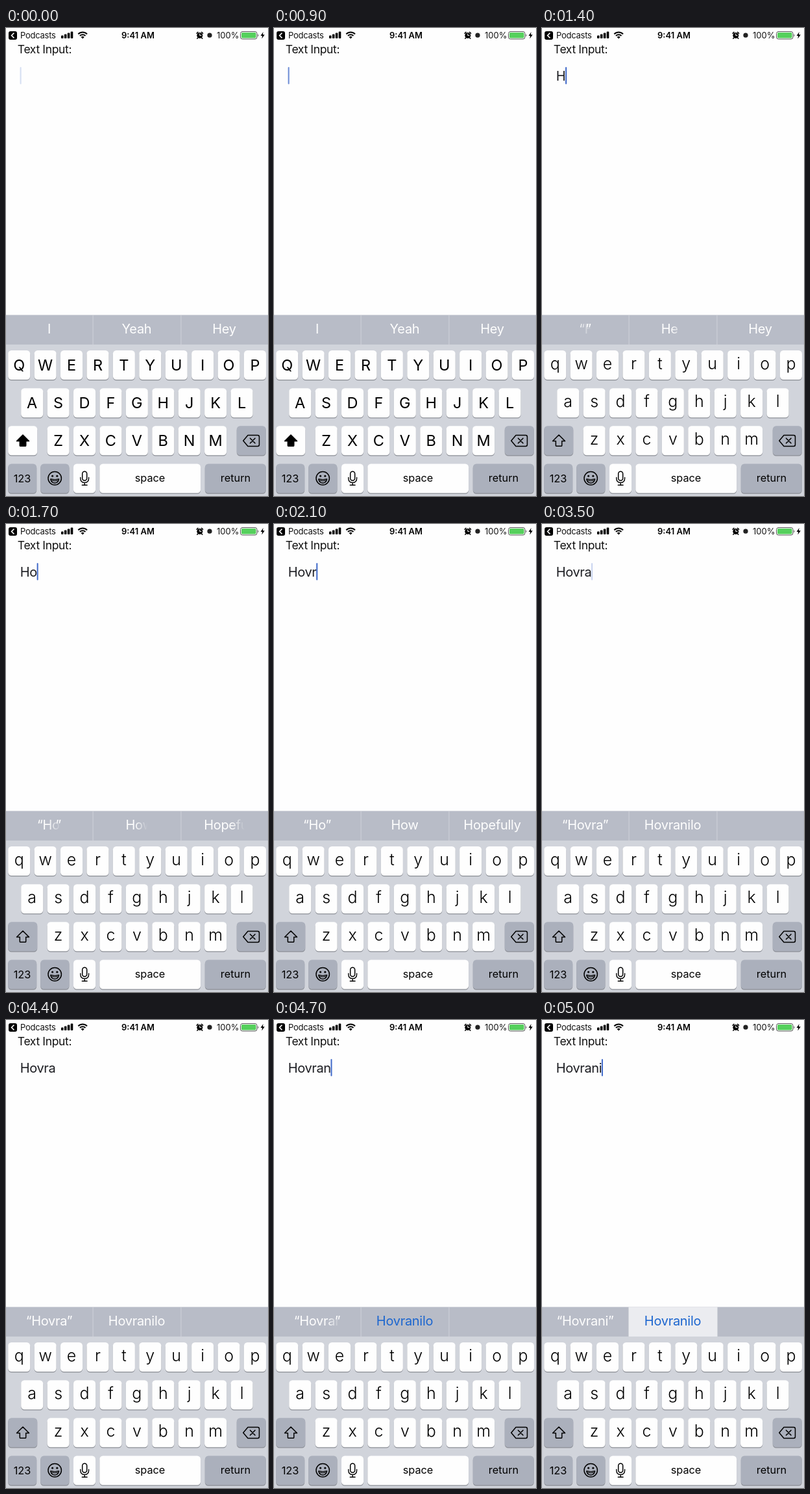
Recreate the animation shown at these times as an HTML page with a canvas. Size 404 by 720 pixels, loop 5100 ms.

```html
<!DOCTYPE html>
<html lang="en">
<head>
<meta charset="utf-8">
<title>Text input</title>
<style>
html, body { margin: 0; width: 100%; height: 100%; overflow: hidden; background: #fefefe; }
canvas { display: block; width: 404px; height: 720px; }
</style>
</head>
<body>
<canvas id="stage"></canvas>
<script>
const W = 404, H = 720, LOOP = 5100;
const FONT = 'Inter, Roboto, sans-serif';
const canvas = document.getElementById('stage');
const ctx = canvas.getContext('2d');
const dpr = window.devicePixelRatio || 1;
canvas.width = W * dpr;
canvas.height = H * dpr;

const NAME = 'Hovranilo';
const KEY_TIMES = [1300, 1600, 1800, 2000, 2300, 4600, 4800];
const quote = n => '\u201c' + NAME.slice(0, n) + '\u201d';
const HINTS = [
  { at: 0, words: ['I', 'Yeah', 'Hey'] },
  { at: 1300, words: [quote(1), 'He', 'Hey'] },
  { at: 1600, words: [quote(2), 'How', 'Hopefully'] },
  { at: 2400, words: [quote(5), NAME, ''] },
  { at: 4700, words: [quote(7), NAME, ''], pick: true }
];
const HINT_MS = 200;
const CENTERS = [66.5, 201.5, 336.5];
const WHITE = '#fefefe', DARK = '#abb0bc';

const clamp = v => Math.max(0, Math.min(1, v));
const mix = (a, b, p) => a + (b - a) * p;

function setFont(size, weight = 400, spacing = 0) {
  ctx.font = `${weight} ${size}px ${FONT}`;
  ctx.letterSpacing = size * spacing + 'px';
}

function text(str, x, y, size, o = {}) {
  setFont(size, o.weight, o.spacing);
  ctx.textAlign = o.align || 'left';
  ctx.fillStyle = o.color || '#111';
  ctx.fillText(str, x, y);
}

function box(x, y, w, h, r, color) {
  ctx.fillStyle = color;
  ctx.beginPath();
  ctx.roundRect(x, y, w, h, r);
  ctx.fill();
}

function path(d, width, fill) {
  const p = new Path2D(d);
  if (fill) { ctx.fillStyle = fill; ctx.fill(p); }
  if (width) { ctx.lineWidth = width; ctx.stroke(p); }
}

function arc(x, y, r, from = 0, to = Math.PI * 2) {
  ctx.beginPath();
  ctx.arc(x, y, r, from, to);
}

function disc(x, y, r) {
  arc(x, y, r);
  ctx.fill();
}

function statusBar() {
  box(4, 5, 13, 13, 3, '#000');
  ctx.strokeStyle = WHITE;
  path('M12 8 L8.5 11.5 L12 15', 1.7);
  text('Podcasts', 22, 16, 13, { spacing: -0.02 });
  for (let i = 0; i < 4; i++) box(85 + i * 4.9, 11.5 - i * 2, 3.6, 4.5 + i * 2, 1, '#000');

  ctx.strokeStyle = ctx.fillStyle = '#000';
  ctx.lineCap = 'butt';
  ctx.lineWidth = 2;
  for (const r of [6, 9.7]) {
    arc(118.2, 16.2, r, -Math.PI * 0.75, -Math.PI * 0.25);
    ctx.stroke();
  }
  path('M118.2 16.6 L115.7 13.9 Q118.2 11.6 120.7 13.9 Z', 0, '#000');

  text('9:41 AM', 203.5, 16, 13, { weight: 600, align: 'center', color: '#000' });

  ctx.fillStyle = '#000';
  disc(298.8, 11.4, 4.5);
  ctx.lineCap = 'round';
  path('M294 8.2 L296 6.4 M303.6 8.2 L301.6 6.4 M296 15 L294.8 16.3 M301.6 15 L302.8 16.3', 1.5);
  ctx.strokeStyle = WHITE;
  path('M298.8 8.8 V11.6 H301', 1);
  ctx.fillStyle = '#222';
  disc(314, 11.2, 3.6);

  text('100%', 325, 16, 13);
  ctx.strokeStyle = '#555';
  ctx.lineWidth = 1;
  ctx.beginPath();
  ctx.roundRect(361.5, 5.5, 25.5, 11.5, 3);
  ctx.stroke();
  box(363, 7, 22.5, 8.5, 1.5, '#55d05c');
  path('M388.4 9.2 Q390.6 11.2 388.4 13.4 Z', 0, '#555');
  path('M396.6 6 L392.6 12 H395.2 L394.4 16.6 L398.8 10.2 H396 Z', 0, '#000');
}

function cursorAlpha(t) {
  const typing = t >= KEY_TIMES[0];
  if (typing && t < 2900 || t >= KEY_TIMES[5]) return 1;
  const phase = (t - (typing ? 150 : 0) + 1000) % 1000;
  if (phase < 40 || phase >= 860) return clamp(1 - ((phase + 140) % 1000) / 180);
  return clamp((phase - 300) / 180);
}

function field(t) {
  const typed = NAME.slice(0, KEY_TIMES.filter(k => t >= k).length);
  text('Text Input:', 17.8, 39, 17.5, { spacing: -0.02 });
  text(typed, 21.8, 81, 20, { spacing: -0.02, color: '#1c1d22' });
  const x = typed ? 21.6 + ctx.measureText(typed).width : 21.6;
  ctx.globalAlpha = cursorAlpha(t);
  box(x, 60, 2, 26.5, 1, '#3f69c9');
  ctx.globalAlpha = 1;
}

// The word grows from the old width to its own, with a soft right edge.
function hint(prev, next, cx, p, color) {
  setFont(20, 400, -0.015);
  ctx.textAlign = 'left';
  const oldW = ctx.measureText(prev).width, newW = ctx.measureText(next).width;
  if (!next || p >= 1 || prev === next) {
    const gone = !next;
    ctx.globalAlpha = gone ? 1 - p : 1;
    ctx.fillStyle = color;
    ctx.fillText(gone ? prev : next, cx - (gone ? oldW : newW) / 2, 469.5);
    ctx.globalAlpha = 1;
    return;
  }
  const w = mix(oldW, newW, p), left = cx - w / 2, right = cx + w / 2;
  const fade = ctx.createLinearGradient(right - 20, 0, right, 0);
  fade.addColorStop(0, 'rgba(254,254,254,1)');
  fade.addColorStop(1, 'rgba(254,254,254,0)');
  const quoted = next.endsWith('\u201d');
  ctx.fillStyle = fade;
  ctx.fillText(quoted ? next.slice(0, -1) : next, left, 469.5);
  if (quoted) {
    ctx.fillStyle = color;
    ctx.fillText('\u201d', right - ctx.measureText('\u201d').width, 469.5);
  }
}

function hintBar(t) {
  ctx.fillStyle = '#b8bcc7';
  ctx.fillRect(0, 441.5, W, 45.5);
  const i = HINTS.filter(h => t >= h.at).length - 1;
  const now = HINTS[i], before = HINTS[i - 1] || now;
  const p = i ? clamp((t - now.at) / HINT_MS) : 1;
  ctx.fillStyle = '#cfd2d9';
  ctx.fillRect(133.6, 442, 1, 45);
  ctx.fillRect(269.4, 442, 1, 45);
  if (now.pick) {
    ctx.globalAlpha = p;
    ctx.fillStyle = '#ebecf0';
    ctx.fillRect(133.6, 441.5, 136.8, 45.5);
    ctx.globalAlpha = 1;
  }
  now.words.forEach((word, n) => {
    hint(before.words[n], word, CENTERS[n], p, now.pick && n === 1 ? '#1c66cf' : WHITE);
  });
}

function key(x, y, w, color) {
  box(x, y + 1.2, w, 45, 5.2, '#8b8e95');
  box(x, y, w, 45, 5.2, color);
}

function letters(row, x, y, caps) {
  [...row].forEach((c, i) => {
    const kx = x + i * 40.42;
    key(kx, y, 34, WHITE);
    text(caps ? c : c.toLowerCase(), kx + 17, y + (caps ? 31 : 29), caps ? 23.5 : 25,
      { align: 'center', color: '#000', weight: caps ? 400 : 300 });
  });
}

function icons(caps) {
  ctx.strokeStyle = '#000';
  ctx.lineJoin = 'round';
  ctx.lineCap = 'round';
  path('M26 626 L35.5 635.5 H30.7 V642.2 Q30.7 643.3 29.6 643.3 H22.4 Q21.3 643.3 21.3 642.2 V635.5 H16.5 Z',
    1.5, caps ? '#000' : null);
  path('M373 626.5 H388 Q390.5 626.5 390.5 629 V641 Q390.5 643.5 388 643.5 H373 L365.8 635 Z', 1.5);
  path('M376.5 631.2 L384 638.8 M384 631.2 L376.5 638.8', 1.6);

  ctx.lineWidth = 1.5;
  arc(75.2, 692.7, 10.2);
  ctx.stroke();
  ctx.fillStyle = '#000';
  disc(71.6, 689.3, 1.5);
  disc(78.8, 689.3, 1.5);
  path('M68.7 694 Q75.2 695.6 81.7 694 Q80.5 700 75.2 700 Q69.9 700 68.7 694 Z', 1.3);
  path('M70 696.3 Q75.2 697.6 80.4 696.3', 1);

  ctx.beginPath();
  ctx.roundRect(117.7, 682.3, 7, 14, 3.5);
  ctx.lineWidth = 1.5;
  ctx.stroke();
  path('M114.8 691.5 V693 Q114.8 699.4 121.2 699.4 Q127.6 699.4 127.6 693 V691.5 M121.2 699.4 V703 M117.3 703.2 H125.1', 1.4);
}

function keyboard(t) {
  const caps = t < KEY_TIMES[0];
  ctx.fillStyle = '#d1d4db';
  ctx.fillRect(0, 487, W, H - 487);
  letters('QWERTYUIOP', 3.2, 496, caps);
  letters('ASDFGHJKL', 23.2, 554.2, caps);
  letters('ZXCVBNM', 63.6, 612.3, caps);
  key(3.2, 612.3, 45, caps ? WHITE : DARK);
  key(355.8, 612.3, 45, DARK);
  key(3.2, 670.5, 44, DARK);
  key(53.2, 670.5, 44.2, DARK);
  key(104, 670.5, 34, WHITE);
  key(144.3, 670.5, 155.8, WHITE);
  key(306.8, 670.5, 94, DARK);
  const label = { align: 'center', color: '#000' };
  text('123', 25, 699, 16.3, label);
  text('space', 222, 698.3, 16.3, label);
  text('return', 354, 698.3, 16.3, label);
  icons(caps);
}

function draw(t) {
  ctx.setTransform(dpr, 0, 0, dpr, 0, 0);
  ctx.fillStyle = '#fefefe';
  ctx.fillRect(0, 0, W, H);
  statusBar();
  field(t);
  hintBar(t);
  keyboard(t);
}

const start = performance.now();
function tick() {
  draw((performance.now() - start) % LOOP);
  requestAnimationFrame(tick);
}
tick();
</script>
</body>
</html>
```
